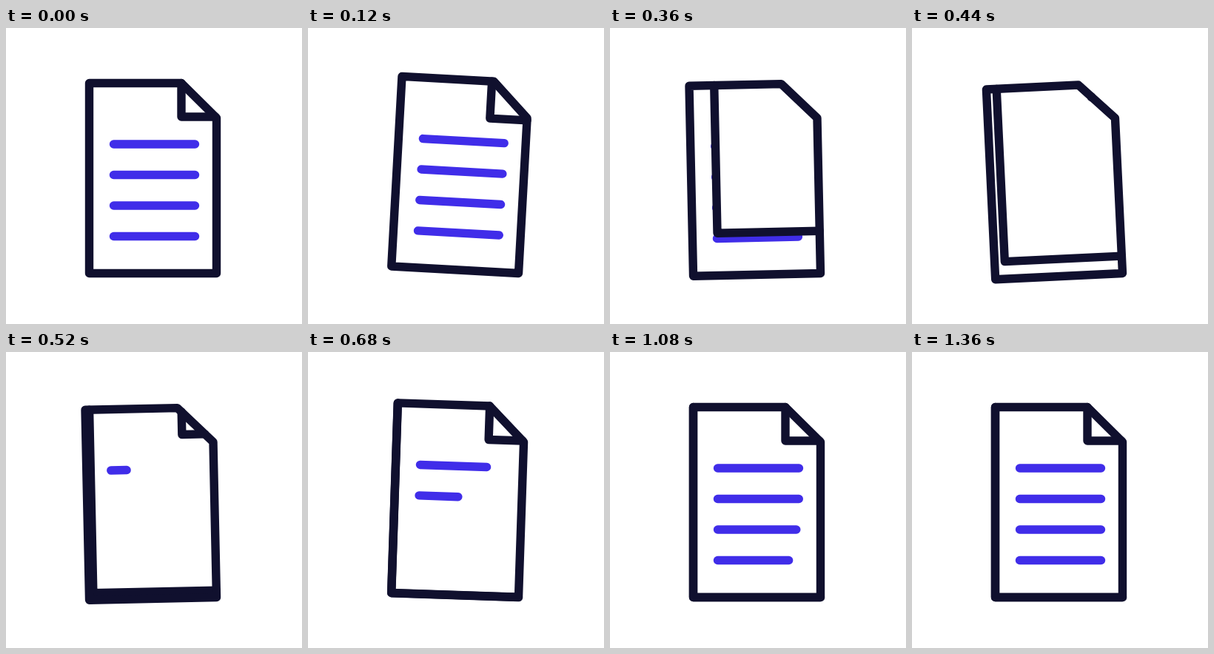
Animation of 400x400 px, one loop 1960 ms. Source, as an HTML page with a canvas:

```html
<!DOCTYPE html>
<html>
<head>
<meta charset="utf-8">
<style>
  html, body { margin: 0; width: 100%; height: 100%; overflow: hidden; background: #fff; }
  canvas { display: block; }
</style>
</head>
<body>
<canvas id="stage" width="400" height="400"></canvas>
<script>
const ctx = document.getElementById('stage').getContext('2d');
const LOOP = 1960, STEP = 40;
const INK = '#10102e', BLUE = '#402de9';
const LEFT = 112.5, RIGHT = 284.5, TOP = 74.5, BOTTOM = 331.5;
const CUT_X = 237, CUT_Y = 121.5;
const LINE_X = 145.5, LINE_LENGTH = 110;
const FOLD = [237, 120], FOLD_START = [254, 91.4];

const clamp = v => Math.min(1, Math.max(0, v));
const mix = (a, b, p) => a + (b - a) * p;
const smooth = u => u * u * (3 - 2 * u);
const phase = (t, start, end) => clamp((t - start) / (end - start));

function bezier(x1, y1, x2, y2) {
  const at = (a, b, s) => 3 * a * s * (1 - s) ** 2 + 3 * b * s * s * (1 - s) + s ** 3;
  return u => {
    if (u <= 0 || u >= 1) return clamp(u);
    let lo = 0, hi = 1;
    for (let i = 0; i < 24; i++) {
      const mid = (lo + hi) / 2;
      if (at(x1, x2, mid) < u) lo = mid; else hi = mid;
    }
    return at(y1, y2, lo);
  };
}
const turnEase = bezier(.755, 0, .095, 1);
const writeEase = bezier(.1, .3, .07, 1);

// [time, degrees]
const SWING = [[0, 0], [256, 7], [398, -3], [702, 2], [920, 0]];
function swing(t) {
  for (let i = 1; i < SWING.length; i++) {
    const [t0, a0] = SWING[i - 1], [t1, a1] = SWING[i];
    if (t < t1) return mix(a0, a1, smooth(phase(t, t0, t1)));
  }
  return 0;
}

function trace(points, color) {
  ctx.beginPath();
  for (const [x, y] of points) ctx.lineTo(x, y);
  ctx.strokeStyle = color;
}

function drawLines(progress) {
  for (let i = 0; i < 4; i++) {
    const p = progress(i), y = 157 + 41.5 * i;
    if (p <= 0) continue;
    trace([[LINE_X, y], [LINE_X + LINE_LENGTH * p, y]], BLUE);
    ctx.stroke();
  }
}

// Flap whose inner corner is (x, y); its ends slide along the page edge.
function drawFlap(x, y) {
  const slope = (CUT_Y - TOP) / (RIGHT - CUT_X);
  const top = [x, Math.max(TOP, TOP + (x - CUT_X) * slope)];
  const side = [Math.min(RIGHT, CUT_X + (y - TOP) / slope), y];
  const corners = [top, [x, y], side];
  if (y > CUT_Y) corners.push([RIGHT, CUT_Y]);
  if (x < CUT_X) corners.push([CUT_X, TOP]);
  trace(corners);
  ctx.fillStyle = '#fff';
  ctx.fill();
  trace([top, [x, y], side], INK);
  ctx.stroke();
}

function draw(t) {
  ctx.fillStyle = '#fff';
  ctx.fillRect(0, 0, 400, 400);
  ctx.save();
  ctx.translate(RIGHT, BOTTOM);
  ctx.rotate(swing(t) * Math.PI / 180);
  ctx.translate(-RIGHT, -BOTTOM);
  ctx.lineWidth = 11.4;
  ctx.lineCap = ctx.lineJoin = 'round';

  // The old page is wiped by the growing flap, then the new one is written.
  drawLines(() => 1);
  const turn = turnEase(phase(t, 0, 718));
  drawFlap(mix(FOLD[0], LEFT, turn), mix(FOLD[1], BOTTOM, turn));
  if (t > 430) {
    const grow = smooth(phase(t, 430, 576));
    drawFlap(mix(FOLD_START[0], FOLD[0], grow), mix(FOLD_START[1], FOLD[1], grow));
  }
  drawLines(i => writeEase(phase(t - 120 * i, 496, 1000)));

  trace([[LEFT, TOP], [CUT_X, TOP], [RIGHT, CUT_Y], [RIGHT, BOTTOM], [LEFT, BOTTOM]], INK);
  ctx.closePath();
  ctx.stroke();
  ctx.restore();
}

const start = performance.now();
function tick() {
  const t = (performance.now() - start) % LOOP;
  draw(Math.min(1360, Math.floor(t / STEP) * STEP));
  requestAnimationFrame(tick);
}
tick();
</script>
</body>
</html>
```
